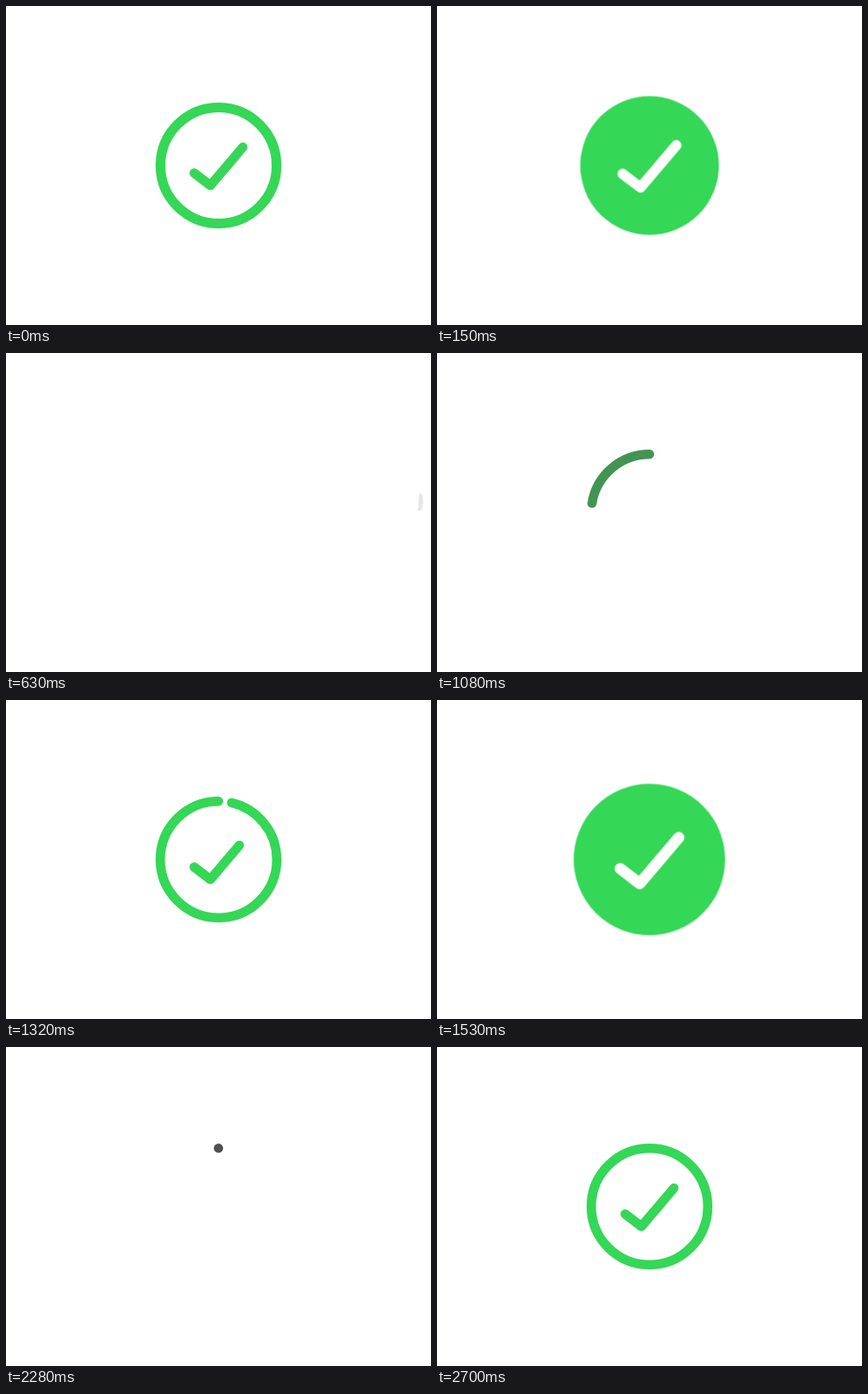
Write an HTML page without scripts that moves like this. It is 480x360 px and loops after 2730 ms.

```html
<!DOCTYPE html>
<html lang="en">
<head>
<meta charset="utf-8">
<title>Success check</title>
<style>
  :root { --green: #34d756; }
  html, body { margin: 0; width: 100%; height: 100%; overflow: hidden; background: #fff; }
  svg { display: block; width: 100vw; height: 100vh; }

  .badge, .ring, .mark, .tick, .trace {
    animation-duration: 2730ms;
    animation-iteration-count: infinite;
    animation-timing-function: linear;
  }
  .ring, .tick { fill: none; stroke: var(--green); stroke-width: 10.5; stroke-linecap: round; stroke-linejoin: round; }
  .badge { animation-name: pulse; }
  .ring { animation-name: draw-ring, fill-ring, tint-ring; }
  .mark { animation-name: shrink-mark; }
  .tick { animation-name: draw-tick, tint-tick; }
  .trace { fill: #e6e6e6; animation-name: show-trace; animation-timing-function: step-end; }

  /* Each loop holds two passes, so most stops come in pairs. */
  @keyframes pulse {
    0%, 3.297%, 49.451%, 52.747%, 98.901%, 100% { transform: scale(1); animation-timing-function: ease-in-out; }
    8.791%, 14.286%, 58.242%, 63.736% { transform: scale(1.3); }
    18.681%, 68.132% { transform: scale(1); animation-timing-function: ease-in; }
    23.07%, 72.52% { transform: scale(0); animation-timing-function: step-end; }
    34.06%, 83.51% { transform: scale(1); }
  }
  @keyframes draw-ring {
    0%, 23.07%, 49.451%, 72.52%, 98.901%, 100% { stroke-dasharray: 100 101; }
    34.06%, 83.51% { stroke-dasharray: 0 101; animation-timing-function: cubic-bezier(.4, 0, .7, .9); }
  }
  @keyframes fill-ring {
    0%, 34.06%, 49.451%, 83.51%, 98.901%, 100% { r: 65.75px; stroke-width: 10.5px; }
    4.396%, 23.07%, 53.846%, 72.52% { r: 35px; stroke-width: 72px; }
  }
  @keyframes tint-ring {
    0%, 23.07%, 45.055%, 72.52%, 94.505%, 100% { stroke: var(--green); }
    34.06%, 83.51% { stroke: #505050; }
  }
  @keyframes shrink-mark {
    0%, 14.286%, 43.95%, 63.736%, 93.4%, 100% { transform: scale(1); }
    18.681%, 68.132% { transform: scale(.21); }
    19.78%, 69.231% { transform: scale(0); animation-timing-function: step-end; }
  }
  @keyframes draw-tick {
    0%, 23.07%, 49.451%, 72.52%, 98.901%, 100% { stroke-dasharray: 100 101; }
    43.95%, 93.4% { stroke-dasharray: 0 101; animation-timing-function: ease-in-out; }
  }
  @keyframes tint-tick {
    0%, 34.06%, 49.451%, 83.51%, 98.901%, 100% { stroke: var(--green); }
    3.297%, 23.07%, 52.747%, 72.52% { stroke: #fff; }
  }
  @keyframes show-trace {
    0%, 34.06%, 83.51%, 100% { opacity: 0; }
    23.07%, 72.52% { opacity: 1; }
  }
</style>
</head>
<body>
<svg viewBox="-240 -180 480 360">
  <g class="badge">
    <!-- Starts at the top and runs counterclockwise -->
    <g transform="rotate(-90) scale(1 -1)">
      <circle class="ring" r="65.75" pathLength="100"/>
    </g>
    <g class="mark">
      <path class="tick" d="M-27.5 8.5L-9.2 22.5L27.5-20.7" pathLength="100"/>
    </g>
  </g>
  <path class="trace" d="M228-22C231-22 232-8 229.5-3.5C228-1.5 225-1.5 225-3.5C227-9 225-20 228-22Z"/>
</svg>
</body>
</html>
```
